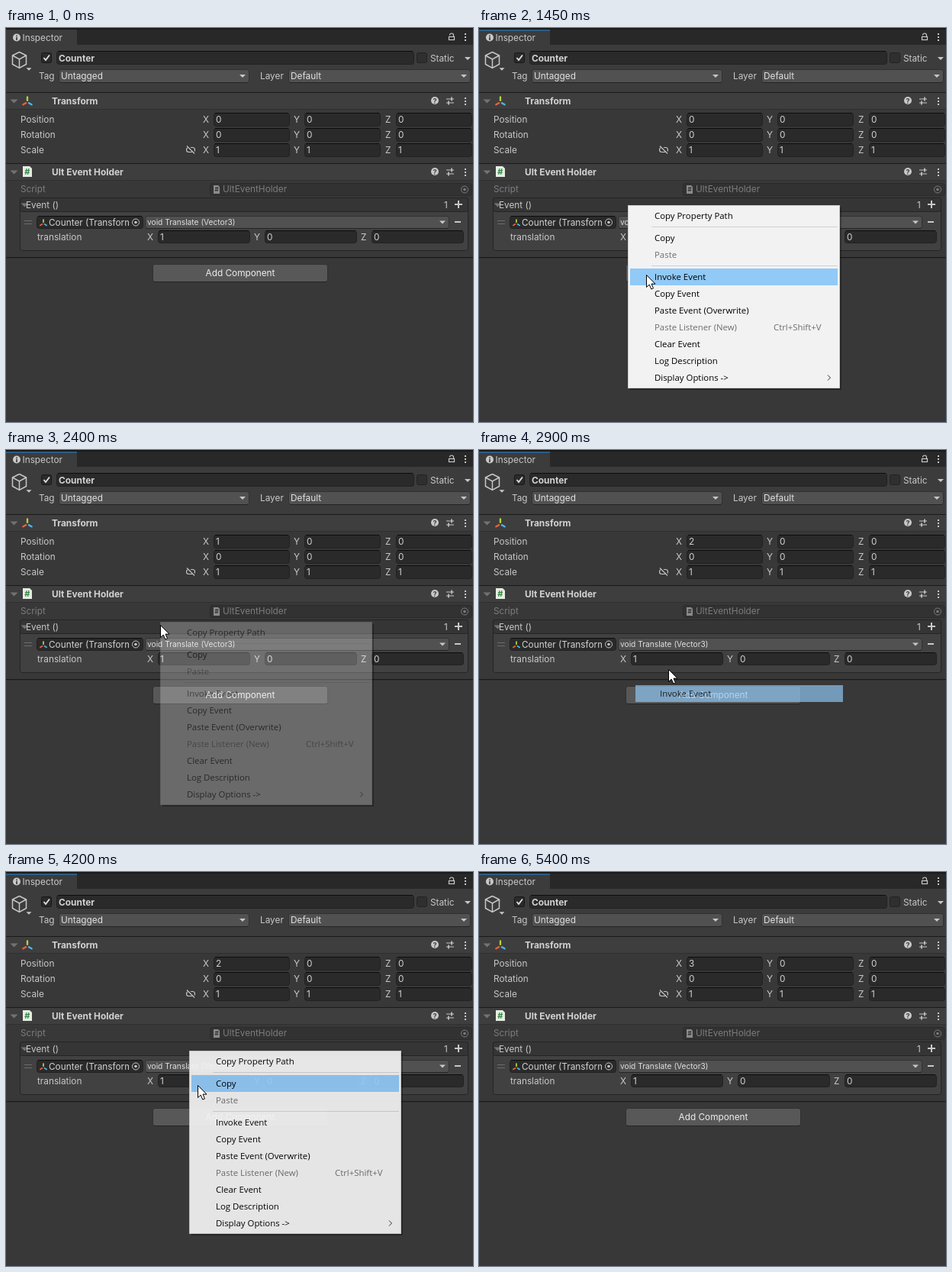
Animation, 612 px wide and 516 px high, one loop 6200 ms. Source, as an HTML page with a canvas:

```html
<!DOCTYPE html>
<html lang="en">
<head>
<meta charset="utf-8">
<title>Inspector</title>
<style>
html, body { margin: 0; width: 612px; height: 516px; overflow: hidden; background: #383838; }
canvas { display: block; }
</style>
</head>
<body>
<canvas id="stage" width="612" height="516"></canvas>
<script>
const stage = document.getElementById('stage');
const layer = stage.cloneNode();
const main = stage.getContext('2d'), overlay = layer.getContext('2d');
let c = main;
const LOOP = 6200, STEP = 50;
const LIGHT = '#c8c8c8', DIM = '#7c7c7c';
const UI = 'Inter, "Liberation Sans", sans-serif';
const MENU_FONT = '11.4px "Open Sans", "Noto Sans", sans-serif';

// Pointer path: time, x, y
const path = [
  [500, 2, 380], [850, 195, 232], [1050, 195, 232], [1400, 219, 324], [1600, 219, 324],
  [1750, 183, 300], [2100, 202, 225], [2350, 202, 225], [2400, 202, 230], [2700, 222, 316],
  [2750, 222, 316], [2900, 248, 288], [3300, 290, 106], [3500, 290, 106], [3950, 240, 234],
  [4100, 240, 234], [4300, 262, 325], [4550, 262, 325], [4800, 285, 342], [5150, 309, 367],
  [5350, 11, 386]
];
const menus = [
  { x: 195, y: 232, open: 960, pick: 1590 },
  { x: 202, y: 225, open: 2360, pick: 2740 },
  { x: 240, y: 234, open: 4060, pick: 4550 }
];
const MENU_W = 278, MENU_H = 240, FADE_IN = 150, FADE_OUT = 500;
const items = [
  { label: 'Copy Property Path', y: 14 },
  { label: 'Copy', y: 43 },
  { label: 'Paste', y: 65, off: true },
  { label: 'Invoke Event', y: 94 },
  { label: 'Copy Event', y: 116 },
  { label: 'Paste Event (Overwrite)', y: 138 },
  { label: 'Paste Listener (New)', y: 160, off: true, keys: 'Ctrl+Shift+V' },
  { label: 'Clear Event', y: 182 },
  { label: 'Log Description', y: 204 },
  { label: 'Display Options ->', y: 226, sub: true }
];
const invoke = items[3];

function rect(x, y, w, h, color) {
  c.fillStyle = color;
  c.fillRect(x, y, w, h);
}
function box(x, y, w, h, fill, edge, r = 3) {
  c.beginPath();
  c.roundRect(x + 0.5, y + 0.5, w - 1, h - 1, r);
  c.fillStyle = fill;
  c.fill();
  c.strokeStyle = edge;
  c.lineWidth = 1;
  c.stroke();
}
function text(s, x, mid, color = LIGHT, font = '11.8px ' + UI) {
  c.font = font;
  c.fillStyle = color;
  c.fillText(s, x, Math.floor(mid + 4));
}
const bold = (s, x, mid) => text(s, x, mid, '#d2d2d2', '700 11.9px ' + UI);
function poly(points, color) {
  c.beginPath();
  points.forEach(([x, y]) => c.lineTo(x, y));
  c.closePath();
  c.fillStyle = color;
  c.fill();
}
function line(points, color, width = 1) {
  c.beginPath();
  points.forEach(([x, y], i) => i ? c.lineTo(x, y) : c.moveTo(x, y));
  c.strokeStyle = color;
  c.lineWidth = width;
  c.stroke();
}
function disc(x, y, r, color) {
  c.beginPath();
  c.arc(x, y, r, 0, 7);
  c.fillStyle = color;
  c.fill();
}
function ring(x, y, r, color) {
  c.beginPath();
  c.arc(x, y, r, 0, 7);
  c.strokeStyle = color;
  c.lineWidth = 1;
  c.stroke();
}
const down = (x, y, w = 4, color = LIGHT) =>
  poly([[x - w, y - w / 2], [x + w, y - w / 2], [x, y + w / 2]], color);

function field(x, y, w, h, value = '') {
  box(x, y, w, h, '#2a2a2a', '#212121');
  rect(x + 2, y, w - 4, 1, '#0d0d0d');
  text(value, x + 3, y + 9, '#d2d2d2');
}
function dropdown(x, y, w, h, label, font) {
  box(x, y, w, h, '#515151', '#303030');
  rect(x + 2, y + h - 1, w - 4, 1, '#242424');
  text(label, x + 3, y + h / 2, '#e0e0e0', font);
  down(x + w - 9, y + h / 2, 4);
}
function vector(xs, y, w, h, values) {
  xs.forEach((x, i) => {
    text('XYZ'[i], x - 14, y + 9);
    field(x, y, w, h, String(values[i]));
  });
}
function kebab(x, y) {
  for (const d of [-4, 0, 4]) rect(x - 1, y + d - 1, 2, 2, LIGHT);
}
function axes(x, y, s) {
  const arm = (a, color) => {
    const dx = Math.cos(a), dy = Math.sin(a);
    c.lineCap = 'round';
    line([[x + dx * s * 0.35, y + dy * s * 0.35], [x + dx * s, y + dy * s]], color, s * 0.36);
    c.lineCap = 'butt';
  };
  arm(-Math.PI / 2, '#b5d33d');
  arm(Math.PI * 0.83, '#f0603c');
  arm(Math.PI * 0.17, '#4fb4ee');
}
function page(x, y, w, h, fill, ink) {
  const l = x - w / 2, t = y - h / 2, k = w * 0.25;
  poly([[l, t], [l + w - k, t], [l + w, t + k], [l + w, t + h], [l, t + h]], fill);
  text('#', x - w * 0.31, y + (h < 12 ? -1 : 0), ink, `700 ${Math.round(h * 0.75)}px ${UI}`);
}
function picker(x, y, color) {
  ring(x, y, 4.5, color);
  disc(x, y, 1.8, color);
}
function header(y, title) {
  rect(0, y, 612, 1, '#1a1a1a');
  rect(0, y + 1, 612, 22, '#3e3e3e');
  rect(0, y + 22, 612, 1, '#303030');
  const m = y + 11.5;
  down(10.5, m + 0.5, 5, '#727272');
  bold(title, 60, y + 12);
  disc(562, m - 0.5, 5, LIGHT);
  text('?', 559.4, m - 0.5, '#3e3e3e', '700 9px ' + UI);
  for (const [d, k] of [[-2.5, 2], [2.5, -2]]) {
    line([[577, m + d], [587, m + d]], LIGHT);
    line([[582 + k, m + d - 2.5], [582 + k, m + d + 2.5]], LIGHT, 1.6);
  }
  kebab(602, y + 12);
}

function tabBar(focused) {
  rect(0, 0, 612, 22, '#282828');
  rect(0, 0, 612, 2, '#191919');
  c.beginPath();
  c.roundRect(0, 2, 93, 20, [0, 3, 0, 0]);
  c.fillStyle = '#3c3c3c';
  c.fill();
  if (focused) rect(0, 2, 93, 2, '#2c5d87');
  disc(14, 12.5, 5, LIGHT);
  rect(13.2, 9.5, 1.7, 1.7, '#3c3c3c');
  rect(13.2, 12, 1.7, 4, '#3c3c3c');
  text('Inspector', 21.5, 13);
  c.beginPath();
  c.arc(584, 9.5, 2.5, Math.PI, 0);
  c.lineTo(586.5, 12);
  c.strokeStyle = LIGHT;
  c.lineWidth = 1.2;
  c.stroke();
  c.strokeRect(580.5, 11.5, 7, 4);
  kebab(602, 12);
}

function objectHeader() {
  rect(0, 22, 612, 62, '#3c3c3c');
  const hex = [[17.5, 31.5], [26.5, 36], [26.5, 47.5], [17.5, 52.5], [8.5, 47.5], [8.5, 36], [17.5, 31.5]];
  line(hex, LIGHT, 1.5);
  line([[8.5, 36], [17.5, 41], [26.5, 36]], LIGHT, 1.5);
  line([[17.5, 41], [17.5, 52.5]], LIGHT, 1.5);
  down(30, 54, 3.5);
  box(46, 32, 14, 14, '#2a2a2a', '#171717', 2);
  line([[49.5, 39], [52, 42], [57, 35.5]], '#e0e0e0', 1.8);
  field(66, 30, 469, 18);
  bold('Counter', 69, 40);
  box(538, 32, 14, 14, '#2f2f2f', '#222222', 2);
  text('Static', 556, 40);
  down(605, 40, 4);
  text('Tag', 43, 63.5);
  dropdown(69, 54, 250, 18, 'Untagged');
  text('Layer', 333, 63.5);
  dropdown(370, 54, 239, 18, 'Default');
}

function transform(posX) {
  header(84, 'Transform');
  axes(28, 97, 6.5);
  const xs = [272, 391, 511];
  [['Position', posX, 0], ['Rotation', 0, 0], ['Scale', 1, 1]].forEach(([name, a, b], i) => {
    const y = 111 + i * 20;
    text(name, 19, y + 9);
    vector(xs, y, 100, 18, [a, b, b]);
  });
  c.beginPath();
  c.roundRect(236.5, 156.5, 11, 6, 3);
  c.strokeStyle = LIGHT;
  c.lineWidth = 1.1;
  c.stroke();
  line([[238, 154.5], [248, 164.5]], '#383838', 3);
  line([[237, 154.5], [247, 164.5]], LIGHT, 1.1);
}

function eventHolder() {
  header(177, 'Ult Event Holder');
  page(28, 188, 12, 14, '#e8ece4', '#2f8a43');
  text('Script', 19, 211.5, DIM);
  box(267, 203, 344, 17, '#323232', '#2b2b2b');
  page(276, 211.5, 8, 11, '#8a8a8a', '#323232');
  text('UltEventHolder', 284, 211.5, DIM);
  picker(601, 211.5, DIM);

  box(18, 222, 588, 70, '#414141', '#242424');
  box(18, 222, 588, 19, '#353535', '#242424');
  down(24.5, 232, 5, '#727272');
  text('Event ()', 26, 232);
  text('1', 574, 232);
  rect(588, 230, 10, 2, LIGHT);
  rect(592, 226, 2, 10, LIGHT);

  rect(24, 252, 10, 1, '#6c6c6c');
  rect(24, 256, 10, 1, '#6c6c6c');
  field(40, 246, 140, 17);
  axes(49, 256, 4.8);
  c.save();
  c.beginPath();
  c.rect(40, 246, 121, 17);
  c.clip();
  text('Counter (Transform)', 56, 255, '#d2d2d2');
  c.restore();
  picker(170, 254.5, LIGHT);
  dropdown(182, 246, 399, 17, 'void Translate (Vector3)', '10.2px ' + UI);
  rect(588, 253, 8, 2, LIGHT);
  text('translation', 41, 274);
  vector([199, 339, 479], 265, 121, 17, [1, 0, 0]);

  rect(0, 300, 612, 1, '#1a1a1a');
  rect(0, 301, 612, 1, '#303030');
  box(192, 309, 230, 24, '#585858', '#303030');
  rect(194, 332, 226, 1, '#242424');
  c.textAlign = 'center';
  text('Add Component', 307, 321, '#eeeeee');
  c.textAlign = 'left';
}

function menuItem(m, it, hot) {
  const y = m.y + it.y;
  if (hot) rect(m.x + 3, y - 11, 272, 22, '#91c9f7');
  const ink = it.off ? '#6d6d6d' : '#000000';
  text(it.label, m.x + 35, y, ink, MENU_FONT);
  if (it.keys) text(it.keys, m.x + 191, y, ink, MENU_FONT);
  if (it.sub) line([[m.x + 262, y - 3.5], [m.x + 265.5, y], [m.x + 262, y + 3.5]], '#333333');
}
function panel(m, p) {
  rect(m.x, m.y, MENU_W, MENU_H, '#cccccc');
  rect(m.x + 1, m.y + 1, MENU_W - 2, MENU_H - 2, '#f2f2f2');
  for (const d of [28, 79]) rect(m.x + 31, m.y + d, 244, 1, '#d0d0d0');
  for (const it of items) {
    const hot = p && p.x >= m.x + 3 && p.x < m.x + 275 && Math.abs(p.y - m.y - it.y) < 11;
    menuItem(m, it, hot);
  }
}
// Draws on the overlay, then blends it as one sheet
function blend(alpha, paint) {
  c = overlay;
  c.clearRect(0, 0, 612, 516);
  paint();
  c = main;
  c.globalAlpha = alpha;
  c.drawImage(layer, 0, 0);
  c.globalAlpha = 1;
}
function menu(m, t, p) {
  if (t <= m.open || t >= m.pick + FADE_OUT) return;
  if (t >= m.pick) {
    blend(1 - (t - m.pick) / FADE_OUT, () => menuItem(m, invoke, true));
    return;
  }
  rect(m.x + 3, m.y + MENU_H, MENU_W - 1, 2, 'rgba(0,0,0,.3)');
  rect(m.x + MENU_W, m.y + 3, 2, MENU_H - 3, 'rgba(0,0,0,.3)');
  blend(Math.min(1, (t - m.open) / FADE_IN), () => panel(m, p));
}

// Slope at a path point; zero at rests and turning points
function slope(i, k) {
  const a = path[i - 1], b = path[i], d = path[i + 1];
  if (!a || !d || (b[k] - a[k]) * (d[k] - b[k]) <= 0) return 0;
  return (d[k] - a[k]) / (d[0] - a[0]);
}
function pointer(t) {
  if (t < path[0][0] || t > path[path.length - 1][0]) return null;
  const i = Math.max(0, path.findIndex(q => q[0] >= t) - 1);
  const a = path[i], b = path[i + 1], span = b[0] - a[0], u = (t - a[0]) / span;
  const at = k => {
    const v = 1 - u;
    return a[k] * v * v * (1 + 2 * u) + b[k] * u * u * (3 - 2 * u) +
      span * u * v * (slope(i, k) * v - slope(i + 1, k) * u);
  };
  return { x: Math.round(at(1)), y: Math.round(at(2)) };
}
function arrow({ x, y }) {
  c.save();
  c.translate(x + 0.5, y - 0.5);
  poly([[0, 0], [0, 16], [3.7, 12.6], [6.3, 18.5], [9, 17.4], [6.5, 11.6], [11.5, 11.6]], '#ffffff');
  c.strokeStyle = '#000000';
  c.lineWidth = 1;
  c.stroke();
  c.restore();
}

function draw(t) {
  const p = pointer(t);
  rect(0, 0, 612, 516, '#383838');
  tabBar(t >= 900);
  objectHeader();
  transform(menus.filter(m => t >= m.pick).length);
  eventHolder();
  menus.forEach(m => menu(m, t, p));
  if (p) arrow(p);
}

let start = null, last = -1;
function tick(now) {
  if (start === null) start = now;
  const t = Math.floor(((now - start) % LOOP) / STEP) * STEP;
  if (t !== last) draw(last = t);
  requestAnimationFrame(tick);
}
draw(0);
requestAnimationFrame(tick);
</script>
</body>
</html>
```
